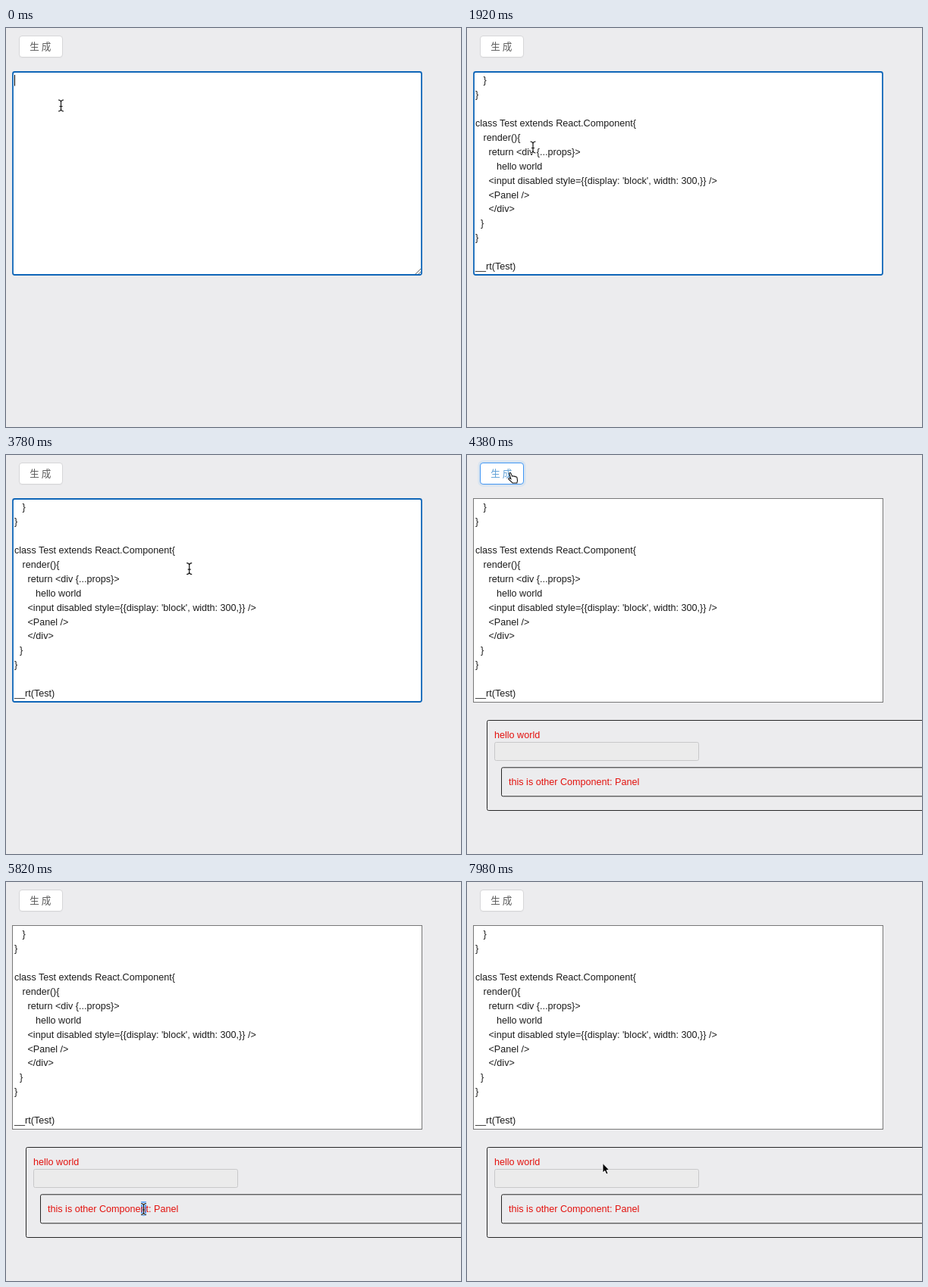
Recreate the animation shown at these times as an HTML page. Size 600 by 527 pixels, loop 8 s.

```html
<!DOCTYPE html>
<html>
<head>
<meta charset="utf-8">
<style>
  html, body { margin: 0; width: 100%; height: 100%; overflow: hidden; background: #ececee; }
  svg { display: block; }
  text { font: 12.6px "Liberation Sans", Arial, sans-serif; fill: #1c1c1c; white-space: pre; }
  #label { font-family: "Noto Sans CJK SC", "Noto Sans CJK", sans-serif; fill: #595959; }
  #output text { fill: #e3120e; }
  .sel { fill: #5aa2f7; }
  .frame { fill: none; stroke: #262626; }
</style>
</head>
<body>
<svg width="600" height="527">
  <defs>
    <path id="stem" fill="none" d="M-3.5-7.5Q-.5-7.5 0-5Q.5-7.5 3.5-7.5M0-5V5M-3.5 7.5Q-.5 7.5 0 5Q.5 7.5 3.5 7.5M-2 1H2"/>
  </defs>

  <rect id="wave" fill="#1890ff"/>
  <rect x="17.5" y="11.5" width="57" height="28" rx="3.6" fill="#e2e2e4"/>
  <rect id="button" x="17.5" y="10.5" width="57" height="28" rx="3.6" fill="#fff"/>
  <text id="label" x="31.3" y="29">生 成</text>

  <rect id="area" fill="#fff"/>
  <path id="grip" d="M540 325l7-7M544 325l3-3" stroke="#666"/>
  <rect id="codeSel" class="sel" y="189" height="19"/>
  <rect id="caret" x="11" y="62" width="1" height="14.5"/>
  <svg x="8" y="57" width="541" height="270" viewBox="8 57 541 270"><g id="code"></g></svg>

  <g id="output">
    <rect class="frame" x="26.5" y="350.5" width="600" height="119" rx="2"/>
    <text x="36" y="374">hello world</text>
    <rect x="36.5" y="379.5" width="269" height="24" rx="2" fill="#ebebeb" stroke="#c8c8ca"/>
    <rect class="frame" x="45.5" y="412.8" width="600" height="38" rx="2"/>
    <rect id="panelSel" class="sel" y="422" height="19"/>
    <text x="55" y="436">this is other Component: Panel</text>
  </g>

  <g id="beam">
    <use href="#stem" stroke="#fff" stroke-width="2.4"/>
    <use href="#stem" stroke="#111" stroke-width="1.2"/>
  </g>
  <path id="arrow" d="M0-.5V12L2.8 9.4L4.8 14L7 13L5 8.6H8.8Z" stroke="#fff" stroke-width=".9"/>
  <g id="hand">
    <path transform="scale(.9)" d="M-1.5.8Q-.5-.8 1 .8L3 5.2Q4.5 4 5.5 5.4Q7 4.6 7.8 6Q9.6 5.6 10 7.4L10.6 11.5L9.8 15H3.5L-2.4 9.4Q-3 7.6-1.2 7.8L1 9Z" fill="#fff" stroke="#111" stroke-width="1.2"/>
  </g>
</svg>
<script>
const LOOP = 8000, STEP = 60, LINE = 18.9;
const PASTE = 660, CLICK = 4260;

const $ = id => document.getElementById(id);
const set = (id, attrs) => { for (const k in attrs) $(id).setAttribute(k, attrs[k]); };
const show = (id, on) => { $(id).style.display = on ? '' : 'none'; };
const within = (v, a, b) => v >= a && v < b;

// Progress from a to b: linear, eased, and there-and-back
const ramp = (t, a, b) => Math.min(1, Math.max(0, (t - a) / (b - a)));
const ease = (t, a, b) => (1 - Math.cos(Math.PI * ramp(t, a, b))) / 2;
const bump = (t, a, b) => Math.sin(Math.PI * ramp(t, a, b)) ** 2;

const rows = `     return <div {...props}>this is other Component: Panel</div>
   }
}

class Test extends React.Component{
   render(){
     return <div {...props}>
        hello world
     <input disabled style={{display: 'block', width: 300,}} />
     <Panel />
     </div>
  }
}

__rt(Test)`.split('\n').map(line => {
  const row = document.createElementNS('http://www.w3.org/2000/svg', 'text');
  row.textContent = line;
  row.setAttribute('x', 11);
  return $('code').appendChild(row);
});

// Pointer moves: when, and where to
const start = { x: 72.5, y: 102.5 };
const moves = [
  { from: 840, to: 1320, x: 87, y: 157.5 },
  { from: 2280, to: 3180, x: 93, y: 202.5 },
  { from: 3180, to: 3540, x: 318, y: 202.5 },
  { from: 3540, to: 4200, x: 57, y: 23.5 },
  { from: 4800, to: 5820, x: 181.5, y: 432 },
  { from: 6180, to: 6480, x: 60, y: 432 },
  { from: 6480, to: 6780, x: 243, y: 434 },
  { from: 6780, to: 7380, x: 179, y: 372 }
];

const pointer = t => moves.reduce((pos, move) => {
  const p = ease(t, move.from, move.to);
  return { x: pos.x + (move.x - pos.x) * p, y: pos.y + (move.y - pos.y) * p };
}, start);

function select(id, on, left, right) {
  show(id, on);
  set(id, { x: left, width: right - left });
}

function drawButton(t, hover) {
  set('button', { stroke: hover ? '#4096f5' : '#d6d6d8' });
  $('label').style.fill = hover ? '#5d9fd6' : '';
  const p = ramp(t, CLICK, CLICK + 420), grow = 5.4 * (1 - (1 - p) ** 2);
  show('wave', t >= CLICK && p < 1);
  set('wave', {
    x: 17 - grow, y: 10 - grow, width: 58 + 2 * grow, height: 29 + 2 * grow,
    rx: 4 + grow, opacity: 0.13 * (1 - p)
  });
}

function drawEditor(t, pasted, clicked) {
  const inset = clicked ? 0.5 : 1;
  set('area', {
    x: 8 + inset, y: 57 + inset, width: 541 - 2 * inset, height: 270 - 2 * inset,
    rx: clicked ? 0 : 2.5, stroke: clicked ? '#777' : '#0f66b8', 'stroke-width': clicked ? 1 : 1.8
  });
  show('caret', t < STEP);
  show('grip', !pasted);
  show('code', pasted);

  const shift = 4.5 * (1 - ease(t, 1740, 1920)) + 12 * bump(t, 840, 1320) + 18 * bump(t, 2280, 3060);
  rows.forEach((row, i) => row.setAttribute('y', Math.round(73.35 + shift + (i - 1) * LINE)));
  select('codeSel', within(t, 3180, 3780),
    74 - 8 * ease(t, 3180, 3300), 77 + 247 * ease(t, 3180, 3540));
}

function draw(t) {
  const { x, y } = pointer(t);
  const pasted = t >= PASTE, clicked = t >= CLICK;
  const over = (l, top, r, bottom) => within(x, l, r) && within(y, top, bottom);
  const hover = over(17, 10, 75, 39);
  const overText = over(8, 57, 549, 327) || clicked && over(55, 422, 228, 442);

  drawButton(t, hover);
  drawEditor(t, pasted, clicked);
  show('output', clicked);
  select('panelSel', within(t, 5820, 7080),
    178 - 123 * ease(t, 6180, 6480), 185 + 43 * ease(t, 6480, 6780));

  const shape = hover ? 'hand' : overText ? 'beam' : 'arrow';
  for (const id of ['hand', 'beam', 'arrow']) show(id, id === shape);
  set(shape, { transform: `translate(${x} ${y})` });
}

function tick() {
  draw(Math.floor(performance.now() % LOOP / STEP) * STEP);
  requestAnimationFrame(tick);
}
tick();
</script>
</body>
</html>
```
